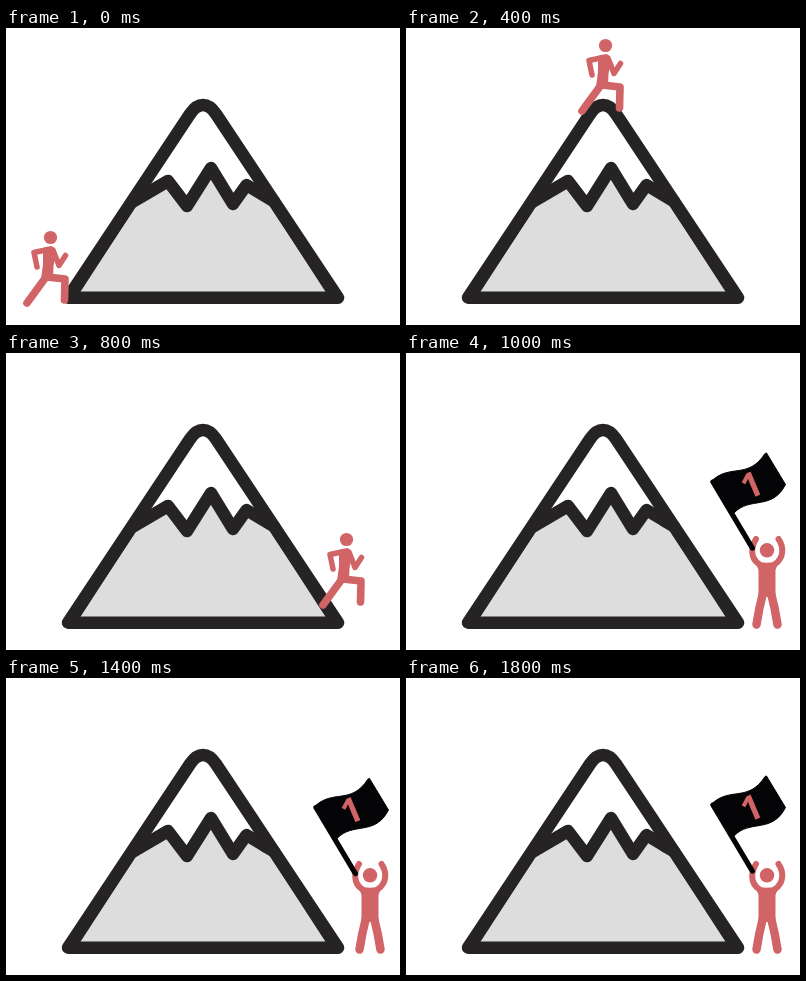
An HTML page that plays this animation: 394x297 px, repeating every 2 s.

```html
<!DOCTYPE html>
<html lang="en">
<head>
<meta charset="utf-8">
<title>Over the mountain</title>
<style>
  html, body { margin: 0; width: 100%; height: 100%; overflow: hidden; background: #fff; }
  svg { display: block; width: 394px; height: 297px; }
  .line { fill: none; stroke-linecap: round; stroke-linejoin: round; }
  .rock { stroke: #252324; stroke-width: 12.5; }
  .red { stroke: #d16467; }
  .fill { fill: #d16467; }
  .cloth { fill: #040406; stroke: #040406; stroke-linejoin: round; }
  text { font: bold 35px "Open Sans", sans-serif; text-anchor: middle; }
</style>
</head>
<body>
<svg viewBox="0 0 394 297">
  <path fill="#ddd" d="M62 270L122 177L162 153L181 178L205 141L227 176L240 157L272 176L332 270Z"/>
  <path class="line rock" d="M127 173.500L162 153L181 178L205 140L227 176L240.500 157L268 173.500"/>
  <path class="line rock" d="M62 269.700L184 86Q190 77 197 77T210 86L332 269.700Z"/>
  <path class="line" stroke="#252324" stroke-width="2" d="M127 181L73.500 263.500M267 181L320.500 263.500"/>

  <g id="runner">
    <circle class="fill" cx="44.500" cy="209.500" r="6.600"/>
    <path class="fill" d="M37 220L45 218Q49 219 50 225L47.500 238L47 251L35 251L37 236Z"/>
    <path class="line red" stroke-width="5.500" d="M42 221.500L28 224.500L31 239M47 222L53 237.500L59.500 227.500"/>
    <path class="line red" stroke-width="7.600" d="M40 249L21 275M41 249L59 251L58.500 272"/>
  </g>

  <g id="climber">
    <circle class="fill" cx="361" cy="197.300" r="7.200"/>
    <path class="line red" stroke-width="6" d="M350 186C345 194 344 205 353 211M372.500 186C378 194 378 205 369 211"/>
    <path class="fill" d="M349 208Q361 211.500 373 208L369.500 217L369.500 243L361 244L352.500 243L352.500 217Z"/>
    <path class="line red" stroke-width="8.500" d="M357 240Q353 255 350.500 271.500M365 240Q369 255 371.500 271.500"/>
  </g>

  <g id="flag">
    <path class="cloth" d="M305 128.500C324 110 342 127 359 100.500L360.500 100L379.500 131.500C366 158 344 143 328 160Z"/>
    <path class="line cloth" stroke-width="5.300" d="M307 129L346.300 195"/>
  </g>
  <g id="digit"><text class="fill" transform="translate(344 132.500) rotate(-23)" x="1.500" y="12.500">1</text></g>
</svg>
<script>
  const STEP = 200, HALF = 5;
  const [runner, climber, flag, digit] =
    ['runner', 'climber', 'flag', 'digit'].map(id => document.getElementById(id));

  // Key points of the way over the mountain, one per stride.
  const trail = [[0, 0], [47, -78], [155, -192], [238, -118], [296, -23]];

  function place(el, shown, x, y) {
    el.setAttribute('visibility', shown ? 'visible' : 'hidden');
    el.setAttribute('transform', `translate(${x} ${y})`);
  }

  function draw(time) {
    const step = Math.floor(time / STEP) % (2 * HALF);
    const cheering = step >= HALF;
    const beat = step % HALF;

    // Every second beat is a jump, each higher than the last.
    const lift = beat % 2 ? 20 + 5 * beat : 0;
    const sway = 3 * Math.cos(Math.PI * beat) * Math.sin(Math.PI * beat / 4);
    const flagY = sway / 2 - beat / 2 - lift * 0.88;

    place(runner, !cheering, ...trail[beat]);
    place(climber, cheering, sway, -lift);
    place(flag, cheering, sway, flagY);
    place(digit, cheering, Math.min(0, sway), flagY);
  }

  const start = performance.now();
  function tick() {
    draw(performance.now() - start);
    requestAnimationFrame(tick);
  }
  tick();
</script>
</body>
</html>
```
